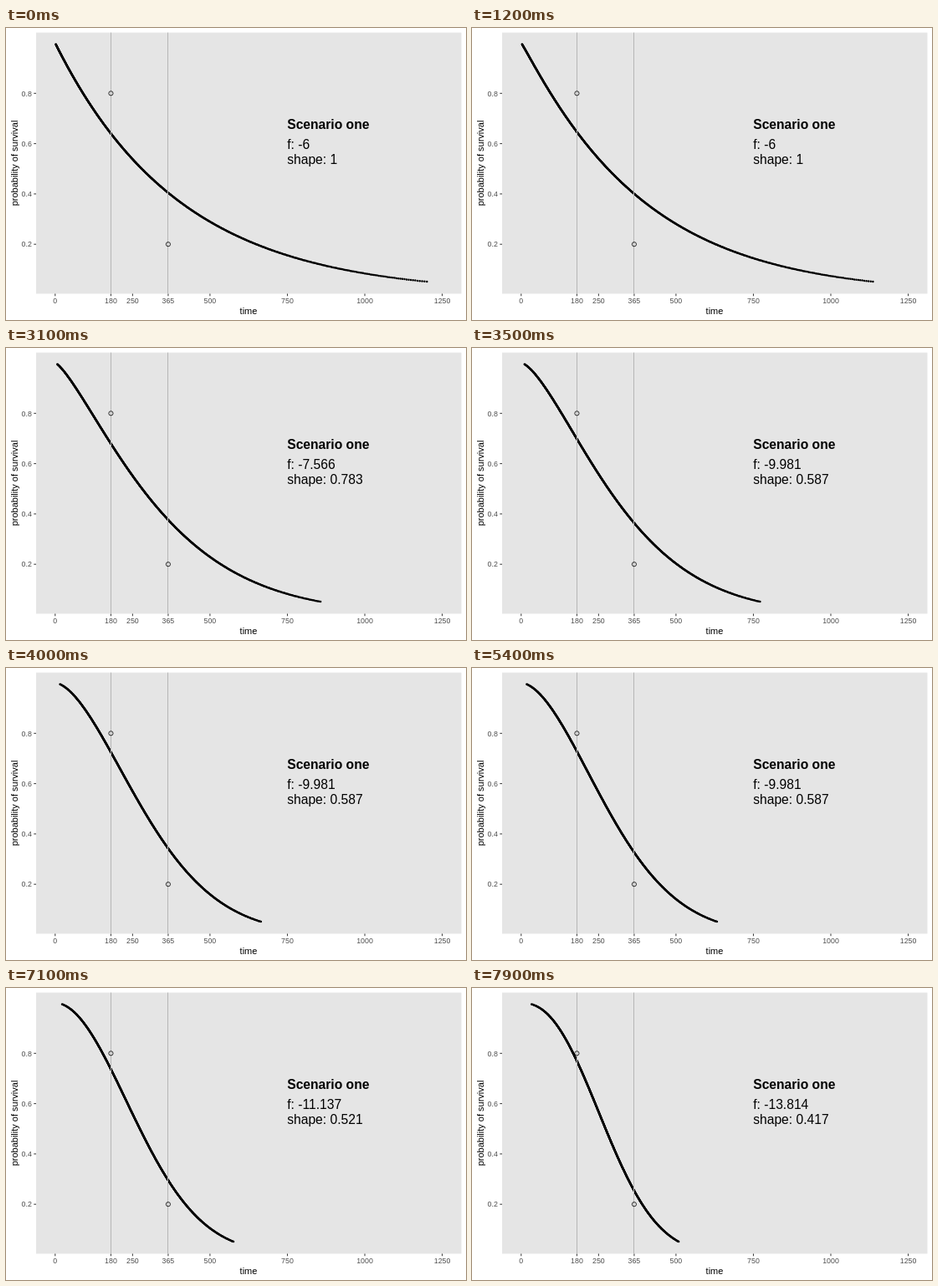
An HTML page with a canvas for the animation above (8 s loop, 550x350 px).

```html
<!DOCTYPE html>
<html>
<head>
<meta charset="utf-8">
<style>
  html, body { margin: 0; overflow: hidden; background: #fff; }
  canvas { display: block; }
</style>
</head>
<body>
<canvas id="chart" width="550" height="350"></canvas>
<script>
const ctx = document.getElementById('chart').getContext('2d');
const FONT = '"Liberation Sans", Arial, sans-serif';

// Weibull survival curves: S(t) = exp(-exp(f) * t^(1/shape))
const scenarios = [
  { f: -6, shape: 1 },
  { f: -7.566, shape: 0.783 },
  { f: -9.981, shape: 0.587 },
  { f: -11.137, shape: 0.521 },
  { f: -13.814, shape: 0.417 }
];

const HOLD = 1000, STEP = 100, CYCLE = 2000;
const px = t => 58.8 + t * 0.3702;
const py = p => 319.5 - p * 301.5;
const timeAt = (p, s) => Math.exp((Math.log(-Math.log(p)) - s.f) * s.shape);

function text(str, x, y, size, { color = '#000', align = 'left', weight = '' } = {}) {
  ctx.font = `${weight} ${size}px ${FONT}`;
  ctx.fillStyle = color;
  ctx.textAlign = align;
  ctx.fillText(str, x, y);
}

function rect(x, y, w, h, color) {
  ctx.fillStyle = color;
  ctx.fillRect(x, y, w, h);
}

function disc(x, y, r) {
  ctx.beginPath();
  ctx.arc(x, y, r, 0, 2 * Math.PI);
}

function drawAxes() {
  rect(0, 0, 550, 350, '#fff');
  rect(36, 5.5, 508.5, 313, '#e5e5e5');
  for (const t of [0, 180, 250, 365, 500, 750, 1000, 1250]) {
    rect(px(t) - 0.5, 318.5, 1, 2.75, '#333');
    text(t, px(t), 329.8, 8.8, { color: '#4d4d4d', align: 'center' });
  }
  for (const p of [0.2, 0.4, 0.6, 0.8]) {
    rect(33.25, py(p) - 0.5, 2.75, 1, '#333');
    text(p, 30.8, py(p) + 3.2, 8.8, { color: '#4d4d4d', align: 'right' });
  }
  text('time', 290, 342.5, 11, { align: 'center' });
  ctx.save();
  ctx.translate(13.6, 162);
  ctx.rotate(-Math.PI / 2);
  text('probability of survival', 0, 0, 11, { align: 'center' });
  ctx.restore();
}

function drawCurve(from, to, mix) {
  ctx.fillStyle = '#000';
  for (let i = 995; i > 50; i--) {
    const p = i / 1000, a = timeAt(p, from), b = timeAt(p, to);
    disc(px(a + (b - a) * mix), py(p), 1.25);
    ctx.fill();
  }
}

function drawTargets() {
  ctx.strokeStyle = '#000';
  ctx.lineWidth = 0.8;
  for (const [t, p] of [[180, 0.8], [365, 0.2]]) {
    rect(Math.floor(px(t)), 5.5, 1, 313, '#b6b6b6');
    disc(px(t), py(p), 2.6);
    ctx.stroke();
  }
}

function draw(ms) {
  const index = Math.floor(ms / CYCLE);
  const from = scenarios[index], to = scenarios[index + 1];
  const mix = Math.max(0, Math.floor((ms % CYCLE - HOLD) / STEP)) / 10;
  const label = mix < 0.5 ? from : to;

  drawAxes();
  drawCurve(from, to, mix);
  drawTargets();
  text('Scenario one', 336.2, 121, 15.65, { weight: 'bold' });
  text('f: ' + label.f, 336.2, 145.2, 15.65);
  text('shape: ' + label.shape, 336.2, 163.2, 15.65);
}

const start = performance.now();
function tick() {
  draw((performance.now() - start) % (CYCLE * (scenarios.length - 1)));
  requestAnimationFrame(tick);
}
tick();
</script>
</body>
</html>
```
